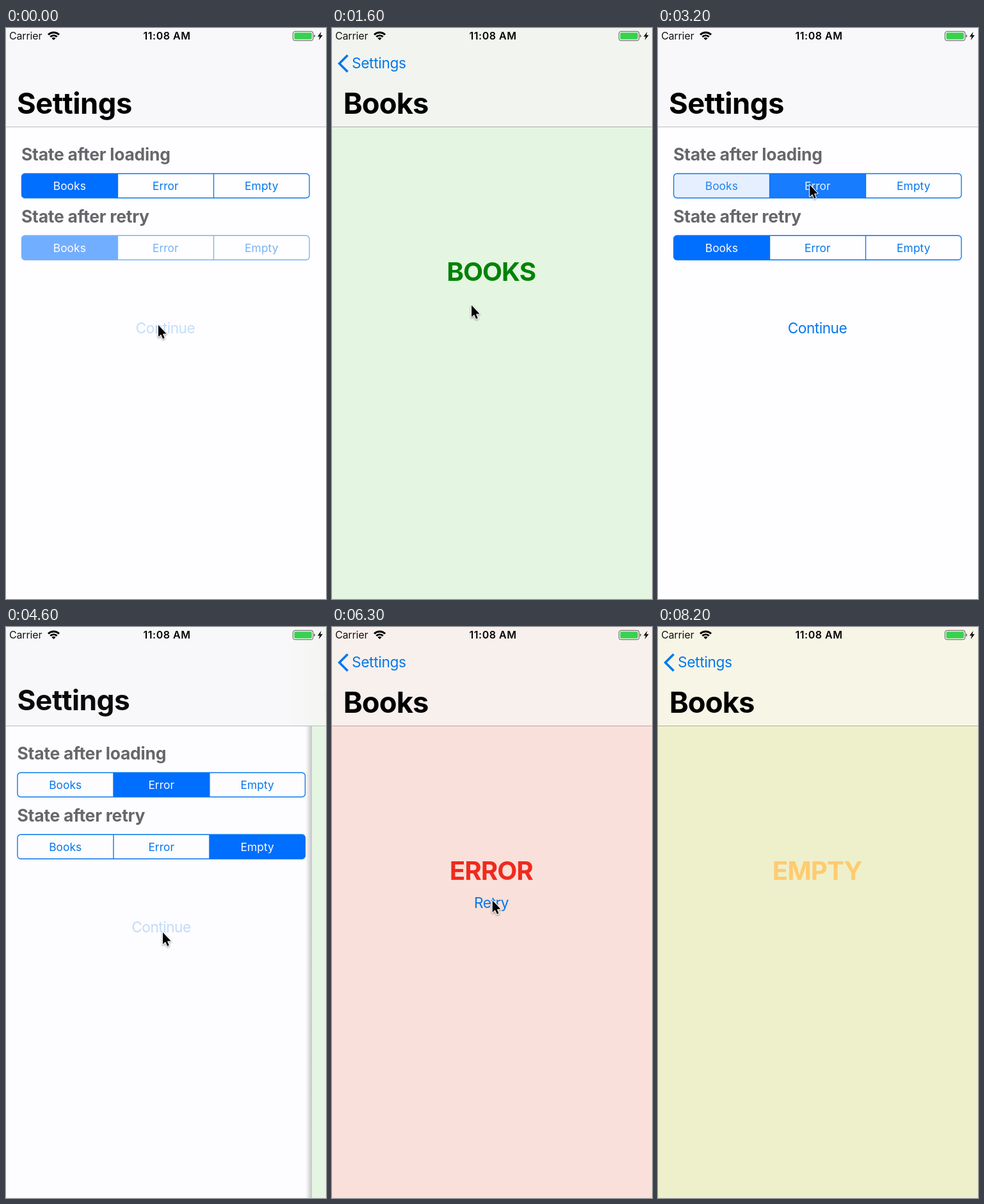
An HTML page with a canvas for the animation above (8.9 s loop, 500 by 892 pixels).

```html
<!DOCTYPE html>
<html lang="en">
<head>
<meta charset="utf-8">
<title>Settings and Books</title>
<style>
html, body { margin: 0; width: 100%; height: 100%; overflow: hidden; background: #fefdff; }
canvas { display: block; width: 500px; height: 892px; }
</style>
</head>
<body>
<canvas id="stage"></canvas>
<script>
const W = 500, H = 892, BAR = 154, LOOP = 8900;
const canvas = document.getElementById('stage');
const ctx = canvas.getContext('2d');
const dpr = window.devicePixelRatio || 1;
canvas.width = W * dpr;
canvas.height = H * dpr;

const BLUE = [0, 110, 255], LINK = [4, 119, 238], WHITE = [254, 253, 255];
const PAGE = { books: [228, 246, 225], error: [249, 224, 218], empty: [238, 240, 203] };
const TINT = { settings: [248, 247, 249], books: [242, 245, 239], error: [248, 240, 237], empty: [247, 245, 230] };

// Times of the taps and state changes, in ms
const PUSH_1 = 60, LOADED_1 = 1400, POP = 2090, PICK_ERROR = 3020, PICK_EMPTY = 3650;
const PUSH_2 = 4538, FAILED = 5900, RETRY = 6550, LOADED_2 = 7500, CURSOR_OFF = 7800;

const CURSOR = [
  [0, 238, 464], [1400, 238, 464], [1600, 218, 433], [2030, 62, 58], [2250, 62, 58],
  [2900, 237, 245], [3250, 237, 245], [3600, 398, 341], [3750, 398, 341],
  [4000, 290, 452], [4200, 245, 477], [5950, 245, 477], [6350, 251, 425], [LOOP, 251, 425]
];

const ramp = (t, start, length) => Math.min(1, Math.max(0, (t - start) / length));
const smooth = p => p * p * (3 - 2 * p);
const lerp = (a, b, p) => a + (b - a) * p;
const mix = (a, b, p) => a.map((v, i) => lerp(v, b[i], p));
const rgb = c => `rgb(${c.map(Math.round).join(',')})`;

function text(str, x, y, size, weight, color, { align = 'left', track = 0, alpha = 1 } = {}) {
  if (alpha <= 0) return;
  ctx.save();
  ctx.globalAlpha *= alpha;
  ctx.font = `${weight} ${size}px Inter, Roboto, sans-serif`;
  ctx.letterSpacing = track + 'px';
  ctx.textAlign = align;
  ctx.fillStyle = color;
  ctx.fillText(str, x, y);
  ctx.restore();
}

function path(points) {
  ctx.beginPath();
  points.forEach(([x, y]) => ctx.lineTo(x, y));
}

function segmented(y, weights, strength) {
  const left = 24.5, width = 449.5, cell = 150, height = 38;
  const link = mix(WHITE, LINK, strength);
  ctx.save();
  ctx.beginPath();
  ctx.roundRect(left, y, width, height, 5);
  ctx.clip();
  weights.forEach((w, i) => {
    ctx.fillStyle = rgb(mix(WHITE, BLUE, w * strength));
    ctx.fillRect(left + i * cell, y, cell, height);
  });
  ctx.restore();
  ctx.strokeStyle = rgb(link);
  ctx.lineWidth = 1.35;
  ctx.beginPath();
  ctx.roundRect(left, y, width, height, 5);
  for (const i of [1, 2]) {
    ctx.moveTo(left + i * cell, y);
    ctx.lineTo(left + i * cell, y + height);
  }
  ctx.stroke();
  ['Books', 'Error', 'Empty'].forEach((name, i) => {
    text(name, left + (i + 0.5) * cell - 0.2, y + 25.3, 17.33, 400,
      rgb(mix(link, WHITE, weights[i])), { align: 'center', track: 0.08 });
  });
}

function continueAlpha(t) {
  const push = t < PICK_ERROR ? PUSH_1 : PUSH_2;
  const pressed = t < PUSH_1 || t > 4350;
  if (t < push) return pressed ? 0.23 : 1;
  return lerp(0.23, 1, ramp(t, push + 60, 350));
}

function settingsPage(t, p) {
  ctx.save();
  ctx.translate(-150 * p, 0);
  ctx.fillStyle = rgb(WHITE);
  ctx.fillRect(0, 0, W + 150, H);
  const heading = { track: -0.25 };
  text('State after loading', 24, 206.5, 26.5, 700, '#67666b', heading);
  text('State after retry', 24, 303.5, 26.5, 700, '#67666b', heading);
  const error = ramp(t, PICK_ERROR, 200);
  const empty = ramp(t, PICK_EMPTY, 200);
  segmented(227.5, [1 - error, error, 0], 1);
  segmented(324.2, [1 - empty, 0, empty], t < PICK_ERROR ? 0.55 : 1);
  text('Continue', 249, 477, 22.67, 400, rgb(LINK),
    { align: 'center', track: -0.5, alpha: continueAlpha(t) });
  ctx.restore();
  ctx.fillStyle = `rgba(0,0,0,${0.1 * p})`;
  ctx.fillRect(0, 0, W, H);
}

// Darkest leaf runs clockwise, one turn per second
function spinner(t) {
  const origin = t < PICK_ERROR ? 360 : t < FAILED + 200 ? 4850 : 6650;
  const head = Math.floor((t - origin) / 1000 * 12 + 0.001);
  ctx.save();
  ctx.translate(249.5, 446.7);
  ctx.lineWidth = 2.5;
  ctx.lineCap = 'round';
  for (let i = 0; i < 12; i++) {
    const age = (((head - i) % 12) + 12) % 12;
    ctx.save();
    ctx.rotate(i * Math.PI / 6);
    ctx.strokeStyle = `rgba(60,66,60,${Math.max(0.2, 0.55 - age * 0.07)})`;
    path([[0, -7.6], [0, -12]]);
    ctx.stroke();
    ctx.restore();
  }
  ctx.restore();
}

function contentState(t) {
  const books = t < PICK_ERROR ? ramp(t, LOADED_1, 150) : 0;
  const error = ramp(t, FAILED, 150) - ramp(t, RETRY, 150);
  const empty = ramp(t, LOADED_2, 120);
  const blend = set => mix(mix(set.books, set.error, error), set.empty, empty);
  return { books, error, empty, page: blend(PAGE), tint: blend(TINT) };
}

function booksPage(t, p, state) {
  const x = W * (1 - p);
  if (p < 1) {
    const shade = ctx.createLinearGradient(x - 10, 0, x, 0);
    shade.addColorStop(0, 'rgba(0,0,0,0)');
    shade.addColorStop(1, 'rgba(0,0,0,0.23)');
    ctx.fillStyle = shade;
    ctx.fillRect(x - 10, 0, 10, H);
  }
  ctx.save();
  ctx.translate(x, 0);
  ctx.fillStyle = rgb(state.page);
  ctx.fillRect(0, 0, W, H);
  const shown = Math.max(state.books, state.error, state.empty);
  if (shown < 1) {
    ctx.globalAlpha = 1 - shown;
    spinner(t);
    ctx.globalAlpha = 1;
  }
  const label = (str, color, alpha) =>
    text(str, 248.7, 395, 40.3, 700, color, { align: 'center', track: -1, alpha });
  label('BOOKS', '#008206', state.books);
  label('ERROR', '#f02a1e', state.error);
  label('EMPTY', '#ffcb70', state.empty);
  const pressed = t > 6400 ? 0.25 : 1;
  text('Retry', 249, 439, 22.67, 400, rgb(LINK),
    { align: 'center', track: -0.5, alpha: state.error * pressed });
  ctx.restore();
}

function navBar(p, tint) {
  const edge = W * (1 - p);
  const fill = ctx.createLinearGradient(edge - 35, 0, edge + 35, 0);
  fill.addColorStop(0, rgb(p < 1 ? TINT.settings : tint));
  fill.addColorStop(1, rgb(p > 0 ? tint : TINT.settings));
  ctx.fillStyle = fill;
  ctx.fillRect(0, 0, W, BAR);
  ctx.fillStyle = rgb(mix([188, 187, 190], tint.map(v => v * 0.71), p));
  ctx.fillRect(0, BAR, W, 1);

  // The large title shrinks into the back button
  ctx.save();
  ctx.translate(lerp(17, 31, p), lerp(133.5, 63, p));
  const scale = lerp(1, 0.475, p);
  ctx.save();
  ctx.scale(scale, scale);
  text('Settings', 0, 0, 45.3, 700, '#000', { track: -0.5, alpha: 1 - p });
  ctx.restore();
  ctx.scale(scale / 0.475, scale / 0.475);
  text('Settings', 0, 0, 22.67, 400, rgb(LINK), { track: -0.32, alpha: p * p });
  ctx.restore();

  text('Books', 17.8 + W * (1 - p), 133.5, 45.3, 700, '#000', { track: -0.9, alpha: p });

  ctx.globalAlpha = p * p;
  ctx.strokeStyle = rgb(LINK);
  ctx.lineWidth = 3.6;
  path([[24.5, 42.5], [11.5, 55.5], [24.5, 68.5]]);
  ctx.stroke();
  ctx.globalAlpha = 1;
}

function statusBar() {
  text('Carrier', 5, 18.3, 16, 400, '#111', { track: -0.15 });
  text('11:08 AM', 251.5, 18.3, 16, 600, '#000', { align: 'center', track: 0.5 });

  ctx.fillStyle = ctx.strokeStyle = '#000';
  const a = -Math.PI * 0.75, b = -Math.PI * 0.25;
  ctx.beginPath();
  ctx.moveTo(74.5, 19);
  ctx.arc(74.5, 19, 4.3, a, b);
  ctx.fill();
  ctx.lineWidth = 2.9;
  for (const r of [7.4, 12]) {
    ctx.beginPath();
    ctx.arc(74.5, 19, r, a, b);
    ctx.stroke();
  }

  ctx.strokeStyle = '#77777a';
  ctx.lineWidth = 1.2;
  ctx.beginPath();
  ctx.roundRect(448.4, 5.3, 31.4, 14.4, 3.5);
  ctx.stroke();
  ctx.fillStyle = '#38d24f';
  ctx.beginPath();
  ctx.roundRect(450.3, 7.2, 27.6, 10.6, 1.8);
  ctx.fill();
  ctx.fillStyle = '#77777a';
  ctx.beginPath();
  ctx.arc(480.9, 12.5, 2.2, -Math.PI / 2, Math.PI / 2);
  ctx.fill();
  ctx.fillStyle = '#000';
  path([[492.5, 6], [486.8, 13.4], [490.2, 13.4], [488.7, 19], [494.8, 11.2], [491.2, 11.2]]);
  ctx.fill();
}

function cursor(t) {
  if (t >= CURSOR_OFF) return;
  const i = CURSOR.findIndex(k => k[0] > t);
  const [t0, x0, y0] = CURSOR[i - 1], [t1, x1, y1] = CURSOR[i];
  const p = smooth((t - t0) / (t1 - t0));
  ctx.save();
  ctx.translate(lerp(x0, x1, p), lerp(y0, y1, p));
  path([[0, 0], [0, 18.5], [4.2, 14.8], [7.1, 21.4], [9.8, 20.2], [7, 13.8], [12.6, 13.4]]);
  ctx.closePath();
  ctx.lineJoin = 'round';
  ctx.lineWidth = 2.2;
  ctx.strokeStyle = '#fff';
  ctx.shadowColor = 'rgba(0,0,0,0.4)';
  ctx.shadowBlur = 3 * dpr;
  ctx.shadowOffsetY = 1.3 * dpr;
  ctx.stroke();
  ctx.shadowColor = 'transparent';
  ctx.fillStyle = '#000';
  ctx.fill();
  ctx.restore();
}

function draw(t) {
  ctx.setTransform(dpr, 0, 0, dpr, 0, 0);
  const slide = start => smooth(ramp(t, start, 500));
  const p = slide(PUSH_1) - slide(POP) + slide(PUSH_2);
  const state = contentState(t);
  if (p < 1) settingsPage(t, p);
  if (p > 0) booksPage(t, p, state);
  navBar(p, state.tint);
  statusBar();
  cursor(t);
}

const begin = performance.now();
function tick() {
  draw((performance.now() - begin) % LOOP);
  requestAnimationFrame(tick);
}
tick();
</script>
</body>
</html>
```
